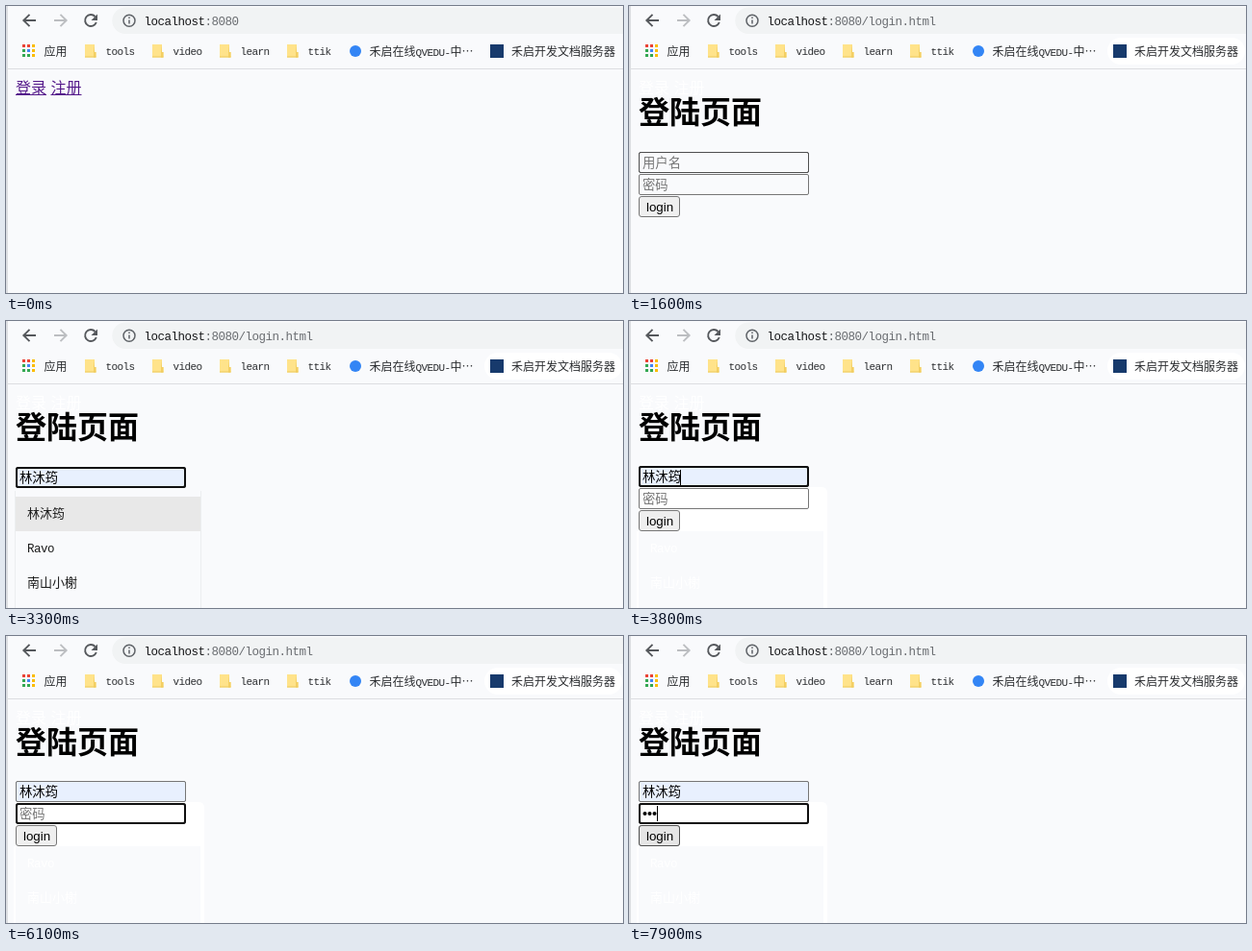
An HTML page that plays this animation: 641x299 px, repeating every 8 s.

```html
<!DOCTYPE html>
<html lang="zh-CN">
<head>
<meta charset="utf-8">
<title>登陆页面</title>
<style>
html, body { margin: 0; width: 100%; height: 100%; overflow: hidden; background: #f9fafc; }
svg { display: block; width: 641px; height: 299px; }
text { font-family: "Noto Sans CJK SC", "Noto Sans CJK", sans-serif; white-space: pre; }
.mono { font-family: "Liberation Mono", monospace; }
.bar { font-size: 12px; fill: #2b2d30; }
.bar .mono, .bar.mono { font-size: 11px; letter-spacing: -.6px; }
.url { font-size: 12.5px; letter-spacing: -.5px; fill: #6a6d71; }
.link { font-size: 16px; }
.field { font-size: 13.33px; }
.hint { fill: #757575; }
.item { font-size: 13px; }
.item.mono { font-size: 12.5px; letter-spacing: -.5px; }
.box { fill: none; stroke: #767676; }
.hover { fill: none; stroke: #4f4f4f; }
.focus { fill: none; stroke: #101010; stroke-width: 2; }

/* Every change is a hard cut on an 8 s loop. */
.a { animation: 8s step-end infinite; opacity: 0; }
.press { animation: press 8s step-end infinite; }
.form { animation: form 8s step-end infinite; }
.home { animation-name: home; }
.path { animation-name: path; }
.login { animation-name: login; }
.userHint { animation-name: userHint; }
.userHover { animation-name: userHover; }
.userFocus { animation-name: userFocus; }
.userCaret { animation-name: userCaret; }
.filled { animation-name: filled; }
.nameCaret { animation-name: nameCaret; }
.list { animation-name: list; }
.pick { animation-name: pick; }
.trace { animation-name: trace; }
.passHint { animation-name: passHint; }
.passHover { animation-name: passHover; }
.passFocus { animation-name: passFocus; }
.passCaret { animation-name: passCaret; }
.dot1 { animation-name: dot1; }
.dot2 { animation-name: dot2; }
.dot3 { animation-name: dot3; }
.btnHover { animation-name: btnHover; }

@keyframes press { 0% { fill: #551a8b } 6.25% { fill: #e00 } 16.25%, 100% { fill: #551a8b } }
@keyframes home { 0% { opacity: 1 } 17.5%, 100% { opacity: 0 } }
@keyframes path { 0% { opacity: 0 } 16.25%, 100% { opacity: 1 } }
@keyframes login { 0% { opacity: 0 } 17.5%, 100% { opacity: 1 } }
@keyframes form { 0% { transform: translateY(1px) } 46.25%, 100% { transform: none } }
@keyframes userHint { 0% { opacity: 1 } 41.25%, 100% { opacity: 0 } }
@keyframes userHover { 0% { opacity: 0 } 20% { opacity: 1 } 53.75%, 100% { opacity: 0 } }
@keyframes userFocus { 0% { opacity: 0 } 33.75% { opacity: 1 } 58.75%, 100% { opacity: 0 } }
@keyframes userCaret { 0% { opacity: 0 } 33.75% { opacity: 1 } 36.25%, 100% { opacity: 0 } }
@keyframes filled { 0% { opacity: 0 } 41.25%, 100% { opacity: 1 } }
@keyframes nameCaret { 0% { opacity: 0 } 46.25% { opacity: 1 } 58.75%, 100% { opacity: 0 } }
@keyframes list { 0% { opacity: 0 } 33.75% { opacity: 1 } 46.25%, 100% { opacity: 0 } }
@keyframes pick { 0% { opacity: 0 } 41.25% { opacity: 1 } 46.25%, 100% { opacity: 0 } }
@keyframes trace { 0% { opacity: 0 } 46.25%, 100% { opacity: 1 } }
@keyframes passHint { 0% { opacity: 1 } 82.5%, 100% { opacity: 0 } }
@keyframes passHover { 0% { opacity: 0 } 53.75% { opacity: 1 } 58.75%, 100% { opacity: 0 } }
@keyframes passFocus { 0% { opacity: 0 } 58.75%, 100% { opacity: 1 } }
@keyframes passCaret {
  0% { opacity: 0; transform: none }
  60% { opacity: 1; transform: none }
  66.25% { opacity: 0; transform: none }
  71.25% { opacity: 1; transform: none }
  76.25% { opacity: 0; transform: none }
  82.5% { opacity: 1; transform: translateX(5px) }
  88.75% { opacity: 0; transform: translateX(5px) }
  90% { opacity: 1; transform: translateX(10px) }
  91.25% { opacity: 1; transform: translateX(15px) }
  97.5% { opacity: 0; transform: translateX(15px) }
  98.75%, 100% { opacity: 1; transform: translateX(15px) }
}
@keyframes dot1 { 0% { opacity: 0 } 82.5%, 100% { opacity: 1 } }
@keyframes dot2 { 0% { opacity: 0 } 90%, 100% { opacity: 1 } }
@keyframes dot3 { 0% { opacity: 0 } 91.25%, 100% { opacity: 1 } }
@keyframes btnHover { 0% { opacity: 0 } 98.75%, 100% { opacity: 1 } }
</style>
</head>
<body>
<svg viewBox="0 0 641 299">
  <defs>
    <g id="folder">
      <path d="M0 0h10v8h1.500v5.500H0z" fill="#ffe38a"/>
      <path d="M10 0v8h1.500v5.500H9V8" fill="#f3cf63"/>
      <path d="M0 13H11.500" stroke="#edc95c"/>
    </g>
    <path id="arrow" d="M14 7H1.500M7.500 .8L1.300 7l6.200 6.200" fill="none" stroke-width="1.900"/>
  </defs>
  <rect width="641" height="299" fill="#f9fafc"/>

  <!-- Toolbar -->
  <use href="#arrow" x="17" y="8" stroke="#55585c"/>
  <use href="#arrow" transform="translate(64 8) scale(-1 1)" stroke="#bcbec1"/>
  <path d="M92.600 11A6 6 0 1 0 93.800 17" fill="none" stroke="#55585c" stroke-width="1.900"/>
  <path d="M95 8.500v6.500h-6.500z" fill="#55585c"/>
  <path d="M641 1.500H124a13.700 13.700 0 0 0 0 27.400H641z" fill="#f1f3f4"/>
  <circle cx="128" cy="15.300" r="6" fill="none" stroke="#5f6368" stroke-width="1.500"/>
  <path d="M128 14.500v4M128 11.500v1.600" stroke="#5f6368" stroke-width="1.500"/>
  <text class="mono url" x="143.500" y="20"><tspan fill="#17181a">localhost</tspan>:8080</text>
  <text class="mono url a path" x="241.500" y="20">/login.html</text>

  <!-- Bookmarks -->
  <rect class="a login" x="497" y="33" width="143" height="28" rx="14" fill="#fff"/>
  <g stroke-width="3" stroke-dasharray="3 2">
    <path d="M17 41.500h8" stroke="#ea4335"/>
    <path d="M17 46.500h3M17 51.500h8" stroke="#34a853"/>
    <path d="M22 46.500h3" stroke="#4285f4"/>
    <path d="M27 41.500h3M27 46.500h3M27 51.500h3" stroke="#fbbc04"/>
  </g>
  <text class="bar" x="39.500" y="51.500">应用</text>
  <use href="#folder" x="82" y="40"/>
  <use href="#folder" x="152" y="40"/>
  <use href="#folder" x="222" y="40"/>
  <use href="#folder" x="292" y="40"/>
  <text class="bar mono" x="103.500" y="51">tools</text>
  <text class="bar mono" x="173.500" y="51">video</text>
  <text class="bar mono" x="243.500" y="51">learn</text>
  <text class="bar mono" x="313.500" y="51">ttik</text>
  <circle cx="363" cy="47" r="6" fill="#3385f5"/>
  <text class="bar" x="377.500" y="51.500">禾启在线<tspan class="mono">QVEDU-</tspan>中…</text>
  <rect x="503" y="40" width="14" height="14" fill="#173a6c"/>
  <text class="bar" x="525" y="51.500">禾启开发文档服务器</text>
  <path d="M2 65.500H641" stroke="#dcdee1"/>
  <path d="M1 0V299" stroke="#dddfe3" stroke-width="2"/>

  <!-- Home page -->
  <g class="a home" fill="#551a8b">
    <g class="press">
      <text class="link" x="10" y="91">登录</text>
      <rect x="10" y="92" width="32" height="1"/>
    </g>
    <text class="link" x="46.500" y="91">注册</text>
    <rect x="46.500" y="92" width="32" height="1"/>
  </g>

  <!-- Login page -->
  <g class="a login">
    <g fill="#fff">
      <text class="link" x="10" y="91">登录</text>
      <text class="link" x="46.500" y="91">注册</text>
    </g>
    <text x="10" y="122" font-size="32" font-weight="700">登陆页面</text>

    <g class="a trace">
      <path d="M10 173H200q6 0 6 6V299H202V219H10z" fill="#fff"/>
      <rect x="8" y="219" width="2" height="80" fill="#fff"/>
      <text class="item mono" x="22" y="241" fill="#fff">Ravo</text>
      <text class="item" x="22" y="276.500" fill="#fff">南山小榭</text>
    </g>

    <g class="form">
      <rect class="box" x="10.500" y="151.500" width="176" height="21" rx="1.500"/>
      <text class="field hint a userHint" x="14" y="167">用户名</text>
      <g class="a filled">
        <rect x="10.500" y="151.500" width="176" height="21" rx="1.500" fill="#e8f0fe" stroke="#767676"/>
        <text class="field" x="14" y="167">林沐筠</text>
      </g>
      <rect class="hover a userHover" x="10.500" y="151.500" width="176" height="21" rx="1.500"/>
      <rect class="focus a userFocus" x="11" y="152" width="175" height="20" rx="2"/>
      <rect class="a userCaret" x="14" y="154" width="1" height="16"/>
      <rect class="a nameCaret" x="53" y="155" width="1" height="16"/>

      <rect class="box" x="10.500" y="174.500" width="176" height="21" rx="1.500"/>
      <text class="field hint a passHint" x="14" y="190">密码</text>
      <rect class="hover a passHover" x="10.500" y="174.500" width="176" height="21" rx="1.500"/>
      <rect class="focus a passFocus" x="11" y="175" width="175" height="20" rx="2"/>
      <circle class="a dot1" cx="16.500" cy="185" r="2"/>
      <circle class="a dot2" cx="21.500" cy="185" r="2"/>
      <circle class="a dot3" cx="26.500" cy="185" r="2"/>
      <rect class="a passCaret" x="14" y="177" width="1" height="16"/>

      <rect x="10.500" y="197.500" width="42" height="21" rx="2.500" fill="#efefef" stroke="#767676"/>
      <rect class="a btnHover" x="10.500" y="197.500" width="42" height="21" rx="2.500" fill="#e5e5e5" stroke="#4f4f4f"/>
      <text x="18" y="213" style="font: 13.33px 'Liberation Sans', sans-serif">login</text>
    </g>

    <!-- Suggestions -->
    <g class="a list">
      <rect x="9" y="175" width="194" height="124" fill="#f9fafc"/>
      <path d="M9.500 177V299M202.500 177V299" stroke="#eceef0"/>
      <rect class="a pick" x="10" y="183" width="192" height="36" fill="#e8e8e8"/>
      <g fill="#1c1c1c">
        <text class="item" x="22" y="205">林沐筠</text>
        <text class="item mono" x="22" y="241">Ravo</text>
        <text class="item" x="22" y="276.500">南山小榭</text>
      </g>
    </g>
  </g>
</svg>
</body>
</html>
```
